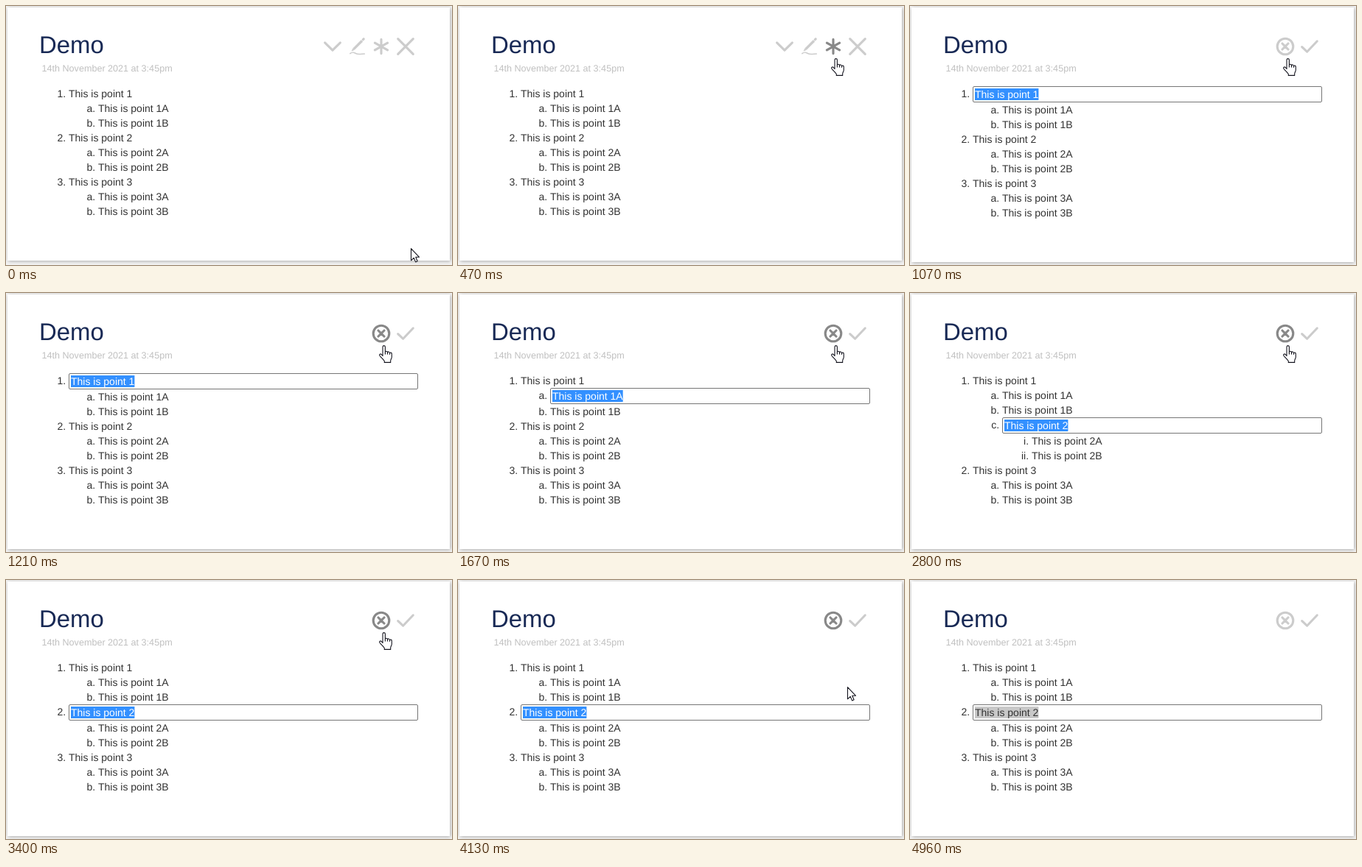
Write an HTML page that moves like this. It is 605x352 px and loops after 5.16 s.

```html
<!DOCTYPE html>
<html lang="en">
<head>
<meta charset="utf-8">
<title>Editable outline</title>
<style>
  html, body { margin: 0; width: 100%; height: 100%; overflow: hidden; background: #f4f4f4; }
  #card {
    position: absolute; left: 2px; top: 2px; width: 600px; height: 344px;
    background: #fff; box-shadow: 1px 1px 5px rgba(0, 0, 0, .3);
  }
  #card.editing { height: 346px; }
  svg { position: absolute; left: 0; top: 0; }
  text {
    font-family: "Liberation Sans", Arial, Helvetica, sans-serif;
    font-size: 14px; fill: #333; text-rendering: geometricPrecision; white-space: pre;
  }
  .title { font-size: 32.9px; fill: #182955; }
  .date { font-size: 12.6px; fill: #c0c0c0; }
  .marker { text-anchor: end; }
  .field { fill: #fff; stroke: #767676; }
  .icon { fill: none; stroke: #ccc; stroke-width: 3.1; stroke-linecap: round; stroke-linejoin: round; }
  .cursor { fill: #fff; stroke: #15151f; stroke-width: 1.1; stroke-linejoin: round; }
</style>
</head>
<body>
<div id="card"></div>
<svg width="605" height="352" viewBox="0 0 605 352">
  <text class="title" x="45" y="64">Demo</text>
  <text class="date" x="48.5" y="89">14th November 2021 at 3:45pm</text>
  <g id="list"></g>

  <g id="viewTools">
    <path class="icon" d="M432.6 49.8L443 60.2L453.4 49.8"/>
    <g class="icon">
      <path stroke-width="3.2" d="M484.3 45.7L485.2 44.8"/>
      <path stroke-width="3.4" stroke-linecap="butt" d="M483 47.2L471.6 58.6"/>
      <path stroke="none" fill="#ccc" d="M470.4 57.4L472.8 59.8L468.4 61.8Z"/>
      <path stroke-width="1.6" d="M466.8 64.6C470 62 472 63 474.5 64.5S480 65.8 486.3 65"/>
    </g>
    <path class="icon" id="star" d="M509 45.4V64.6M500.4 50.2L517.6 59.8M500.4 59.8L517.6 50.2"/>
    <path class="icon" d="M531.7 44.7L552.3 65.3M552.3 44.7L531.7 65.3"/>
  </g>

  <g id="editTools">
    <path class="icon" id="cancel" d="M498.2 55a10.8 10.8 0 1 0 21.6 0a10.8 10.8 0 1 0-21.6 0M505 51L513 59M513 51L505 59"/>
    <path class="icon" d="M531.7 55.6L538.6 62.2L552.3 47.8"/>
  </g>

  <path class="cursor" id="arrow" d="M.5.7V16.8L4.2 13.3L6.6 18.9L9.1 17.8L6.8 12.3H11.6Z"/>
  <g class="cursor" id="hand">
    <path d="M5 14.5V2.3a1.7 1.7 0 0 1 3.4 0V9c.6-1.2 2.8-1.1 3.1.6c.7-1.1 2.8-.9 3 .8c.9-.9 2.8-.3 2.8 1.4V16c0 2-1.6 3.4-1.6 5v2.4H7.3V21.5C6 19.5 3 17 1 14.2C0 12.7 1.7 11.2 3.2 12.4Z"/>
    <path fill="none" d="M8.4 9v3.5M11.5 9.6v3M14.5 10.4v2.4"/>
  </g>
</svg>

<script>
const LOOP = 5160;
const $ = id => document.getElementById(id);
const labels = ['1', '1A', '1B', '2', '2A', '2B', '3', '3A', '3B'];
const numbering = [n => n, n => ' abc'[n], n => 'i'.repeat(n)];

// Start time, focused row, whether point 2 is nested under point 1
const edits = [[0, -1, 0], [1070, 0, 0], [1670, 1, 0], [1800, 2, 0],
               [1940, 3, 0], [2800, 3, 1], [3400, 3, 0]];

// Pointer tip at each step of its two trips
const trips = [
  { start: 70, step: 200 / 3, path: [[548, 318], [542, 268], [533, 200], [523, 130], [516, 84], [513, 74], [512, 71]] },
  { start: 4130, step: 70, path: [[528, 145], [537, 186], [548, 226], [557, 261], [565, 292], [571, 333], [583, 360]] }
];

function rowMarkup(i, level, number, top, focused, active) {
  const x = 85 + 40 * level;
  const words = `This is point ${labels[i]}`;
  let out = `<text class="marker" x="${x - 3.9}" y="${top + 15}">${number}.</text>`;
  if (!focused) return out + `<text x="${x}" y="${top + 15}">${words}</text>`;
  const width = labels[i].length > 1 ? 95.7 : 86.4;
  out += `<rect class="field" x="${x + .5}" y="${top + .5}" width="${558 - x}" height="21" rx="1.5"/>`;
  out += `<rect x="${x + 3}" y="${top + 3}" width="${width}" height="16" fill="${active ? '#3390ff' : '#c8c8c8'}"/>`;
  return out + `<text x="${x + 3}" y="${top + 16}" style="fill:${active ? '#fff' : '#333'}">${words}</text>`;
}

let shown = '';
function drawList(focus, nested, active) {
  const key = [focus, nested, active].join();
  if (key === shown) return;
  shown = key;
  const counts = [0, 0, 0];
  let top = 109, out = '';
  labels.forEach((label, i) => {
    const level = label.length - 1 + (nested && label[0] === '2' ? 1 : 0);
    counts[level]++;
    counts.fill(0, level + 1);
    out += rowMarkup(i, level, numbering[level](counts[level]), top, i === focus, active);
    top += i === focus ? 22 : 20;
  });
  $('list').innerHTML = out;
}

function show(el, on) { el.style.display = on ? '' : 'none'; }

function tint(el, amount) {
  const c = Math.round(204 - 68 * Math.min(1, Math.max(0, amount)));
  el.style.stroke = `rgb(${c},${c},${c})`;
}

function pointer(t) {
  let spot = [549, 329];
  for (const { start, step, path } of trips) {
    if (t >= start) spot = path[Math.min(path.length - 1, Math.floor((t - start) / step + 1e-6))];
  }
  return spot;
}

function draw(t) {
  const [, focus, nested] = edits.filter(e => t >= e[0]).pop();
  const editing = focus >= 0;
  drawList(focus, nested, t < 4960);
  $('card').className = editing ? 'editing' : '';
  show($('viewTools'), !editing);
  show($('editTools'), editing);

  tint($('star'), Math.floor((t - 333) / 66.6) / 2);
  const fadeIn = Math.floor((t - 1070) / 70) / 2;
  const fadeOut = 1 - Math.floor((t - 4130) / 70) / 2;
  tint($('cancel'), t < 4130 ? fadeIn : fadeOut);

  const [x, y] = pointer(t);
  const over = t >= 333 && t < 4130;
  show($('hand'), over);
  show($('arrow'), !over && t < 4550);
  $('hand').setAttribute('transform', `translate(${x - 6},${y})`);
  $('arrow').setAttribute('transform', `translate(${x},${y})`);
}

let origin;
function tick(now) {
  origin ??= now;
  draw((now - origin) % LOOP);
  requestAnimationFrame(tick);
}
draw(0);
requestAnimationFrame(tick);
</script>
</body>
</html>
```
